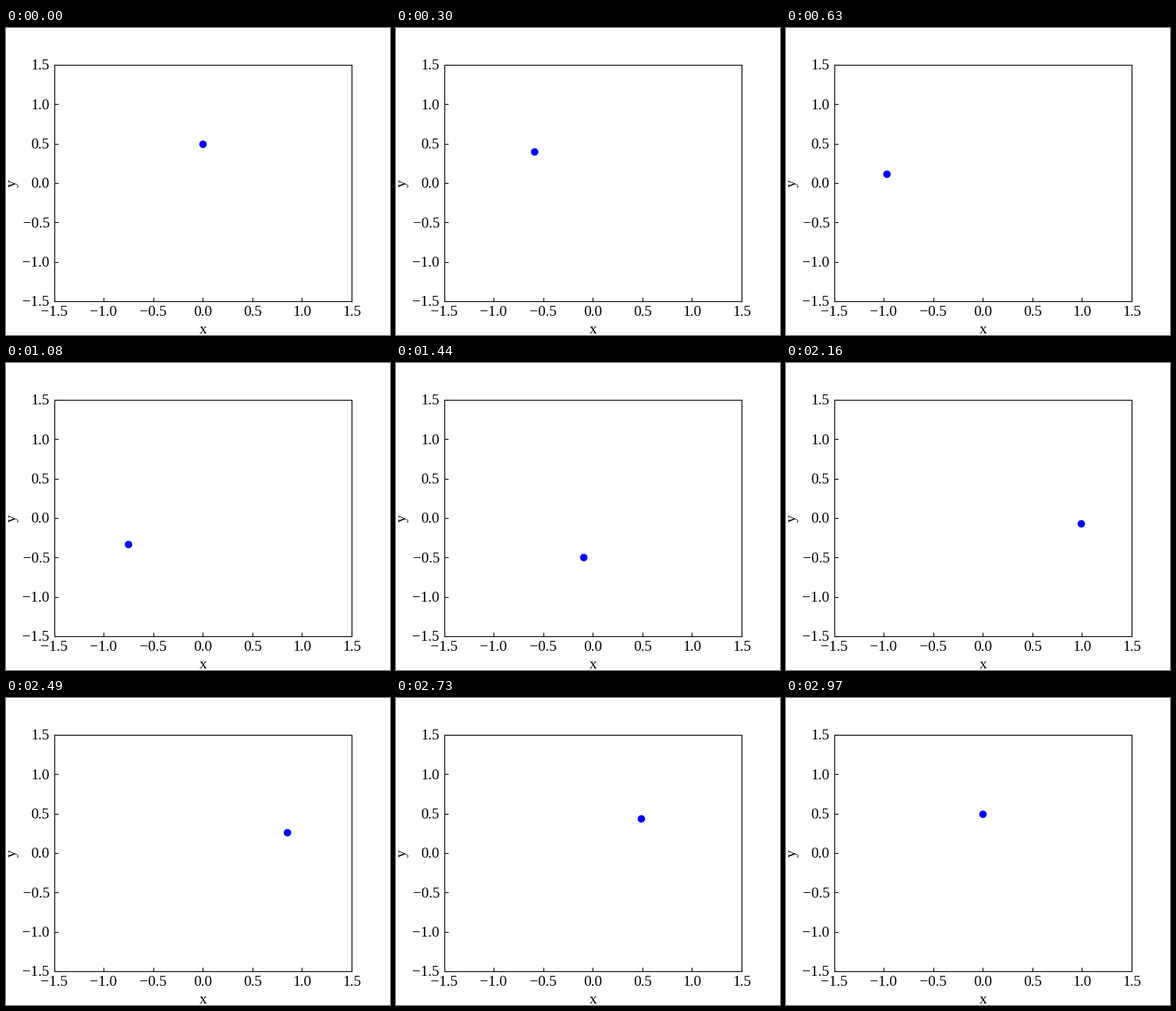
These frames come from a looping animation (500 px wide and 400 px high, 3 s). A matplotlib script:

```python
import numpy as np
import matplotlib.pyplot as plt
from matplotlib.animation import FuncAnimation

FRAMES = 100
INTERVAL = 30

plt.rcParams.update({
    "font.family": "Liberation Serif",
    "font.size": 14,
    "xtick.direction": "in",
    "ytick.direction": "in",
    "xtick.major.pad": 4.2,
    "ytick.major.pad": 4.2,
})

fig, ax = plt.subplots(figsize=(5, 4), dpi=100)
ticks = np.arange(-1.5, 1.6, 0.5)
ax.set(xlim=(-1.5, 1.5), ylim=(-1.5, 1.5), xticks=ticks, yticks=ticks)
ax.set_xlabel("x", labelpad=4.7)
ax.set_ylabel("y", labelpad=3.3)
dot, = ax.plot([], [], "o", color="blue")

# Both ends of the turn are included, so the loop rests one step at the top.
angles = np.linspace(0, 2 * np.pi, FRAMES)


def update(i):
    dot.set_data([-np.sin(angles[i])], [0.5 * np.cos(angles[i])])
    return dot,


anim = FuncAnimation(fig, update, frames=FRAMES, interval=INTERVAL,
                     repeat=True, repeat_delay=0)
plt.show()
```
